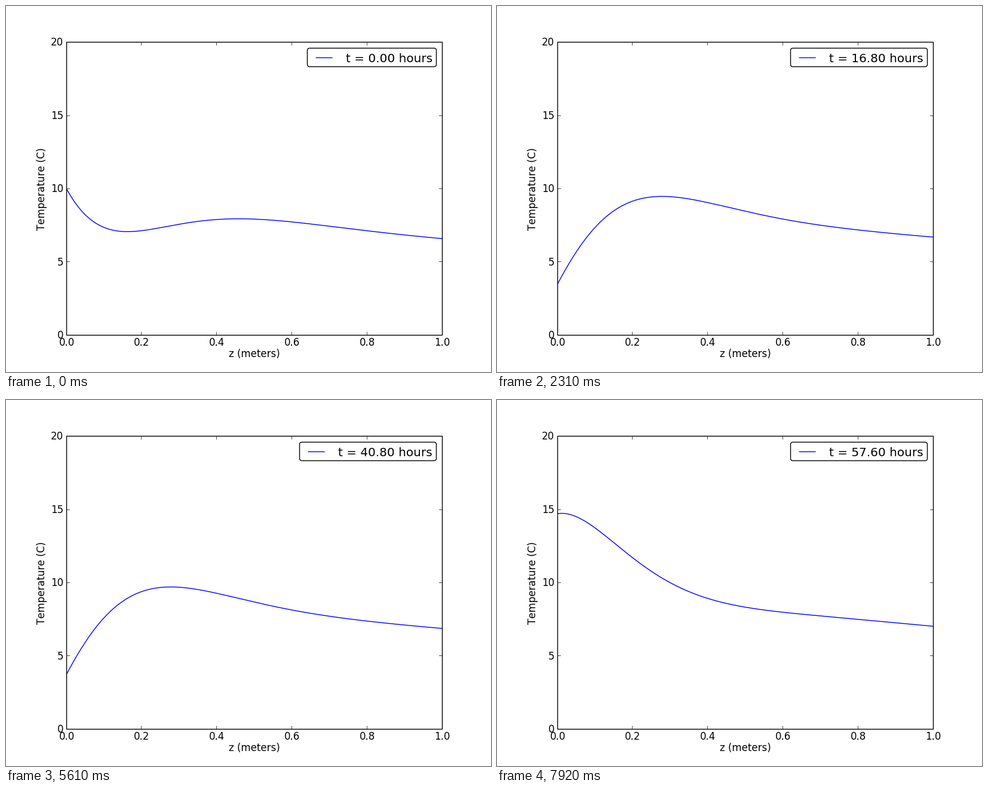
These frames come from a looping animation (812x612 px, 8 s). A matplotlib script:

```python
import numpy as np
import matplotlib.pyplot as plt
from matplotlib.animation import FuncAnimation
from matplotlib.patches import FancyBboxPatch, Rectangle

W, H, DPI = 812, 612, 100
PT = DPI / 72                      # pixels per point
LEFT, RIGHT = 0.125 * W, 0.9 * W   # plot area in pixels, y downwards
TOP, BOTTOM = 0.1 * H, 0.9 * H

LOOP, STEP, INTERVAL = 8000, 330, 20   # ms
HOURS_PER_STEP = 2.4

# Ground temperature: mean plus damped daily and yearly waves
MEAN, DIFFUSIVITY = 10.0, 1e-6
DAY = 24 * 3600
WAVES = [(7.0, DAY), (15.0, 365 * DAY)]

plt.rcParams["font.family"] = "DejaVu Sans"
plt.rcParams["font.size"] = 12
plt.rcParams["text.kerning_factor"] = 6
plt.rcParams["lines.solid_capstyle"] = "butt"


def temperature(z, t):
    total = np.full_like(z, MEAN)
    for amp, period in WAVES:
        omega = 2 * np.pi / period
        a = np.sqrt(omega / (2 * DIFFUSIVITY))
        total += amp * np.exp(-a * z) * np.sin(omega * t - a * z)
    return total


def px(z):
    return LEFT + (RIGHT - LEFT) * z


def py(temp):
    return BOTTOM - (BOTTOM - TOP) * temp / 20


def snap(v):
    return np.floor(v + 0.5) - 0.5


fig = plt.figure(figsize=((W + 1e-6) / DPI, (H + 1e-6) / DPI), dpi=DPI,
                 facecolor="white")
ax = fig.add_axes([0, 0, 1, 1])
ax.set_xlim(0, W)
ax.set_ylim(H, 0)
ax.axis("off")


def segment(x, y, color="black", width=1.0, z=3):
    return ax.plot(x, y, color=color, lw=width, zorder=z, snap=False)[0]


def label(x, y, s, **kw):
    return ax.text(x, y, s, va="baseline", zorder=6, **kw)


# Frame, ticks and labels
x0, x1, y0, y1 = snap(LEFT), snap(RIGHT), snap(TOP), snap(BOTTOM)
ax.add_patch(Rectangle((x0, y0), x1 - x0, y1 - y0, fill=False, ec="black",
                       lw=1, zorder=4, snap=False))
tick = 4 * PT
for i in range(6):
    x = px(i / 5)
    label(x, 568, f"{i / 5:.1f}", ha="center")
    if 0 < i < 5:
        segment([snap(x)] * 2, [y1, y1 - tick], width=0.5)
        segment([snap(x)] * 2, [y0, y0 + tick], width=0.5)
for i in range(5):
    y = py(5 * i)
    label(LEFT - tick, y + 5.2, str(5 * i), ha="right")
    if 0 < i < 4:
        segment([x0, x0 + tick], [snap(y)] * 2, width=0.5)
        segment([x1, x1 - tick], [snap(y)] * 2, width=0.5)
label((LEFT + RIGHT) / 2, 587, "z (meters)", ha="center")
label(65, (TOP + BOTTOM) / 2, "Temperature (C)", ha="center", rotation=90,
      rotation_mode="anchor")

# Legend, grows leftwards with the number of digits
box = FancyBboxPatch((504.5, 70.5), 216, 31, fc="white", ec="black", lw=1,
                     boxstyle="round,pad=0,rounding_size=4", zorder=5,
                     snap=False)
ax.add_patch(box)
key = segment([], [], "blue", z=6)
caption = label(0, 94, "", ha="left", fontsize=14.4)

depth = np.linspace(0, 1, 401)
curve = segment(px(depth), py(temperature(depth, 0)), "blue", z=2)


def draw(i):
    step = ((i + 1) * INTERVAL - 1) // STEP
    hours = step * HOURS_PER_STEP
    curve.set_ydata(py(temperature(depth, hours * 3600)))

    left = 504.5 if hours < 9.995 else 491.5
    box.set_bounds(left, 70.5, 720.5 - left, 31)
    key.set_data([left + 14.2, left + 42.2], [86.5, 86.5])
    caption.set_x(left + 64.3)
    caption.set_text(f"t = {hours:.2f} hours")
    return curve, box, key, caption


anim = FuncAnimation(fig, draw, frames=LOOP // INTERVAL, interval=INTERVAL,
                     repeat=True, repeat_delay=0, blit=False)
plt.show()
```
